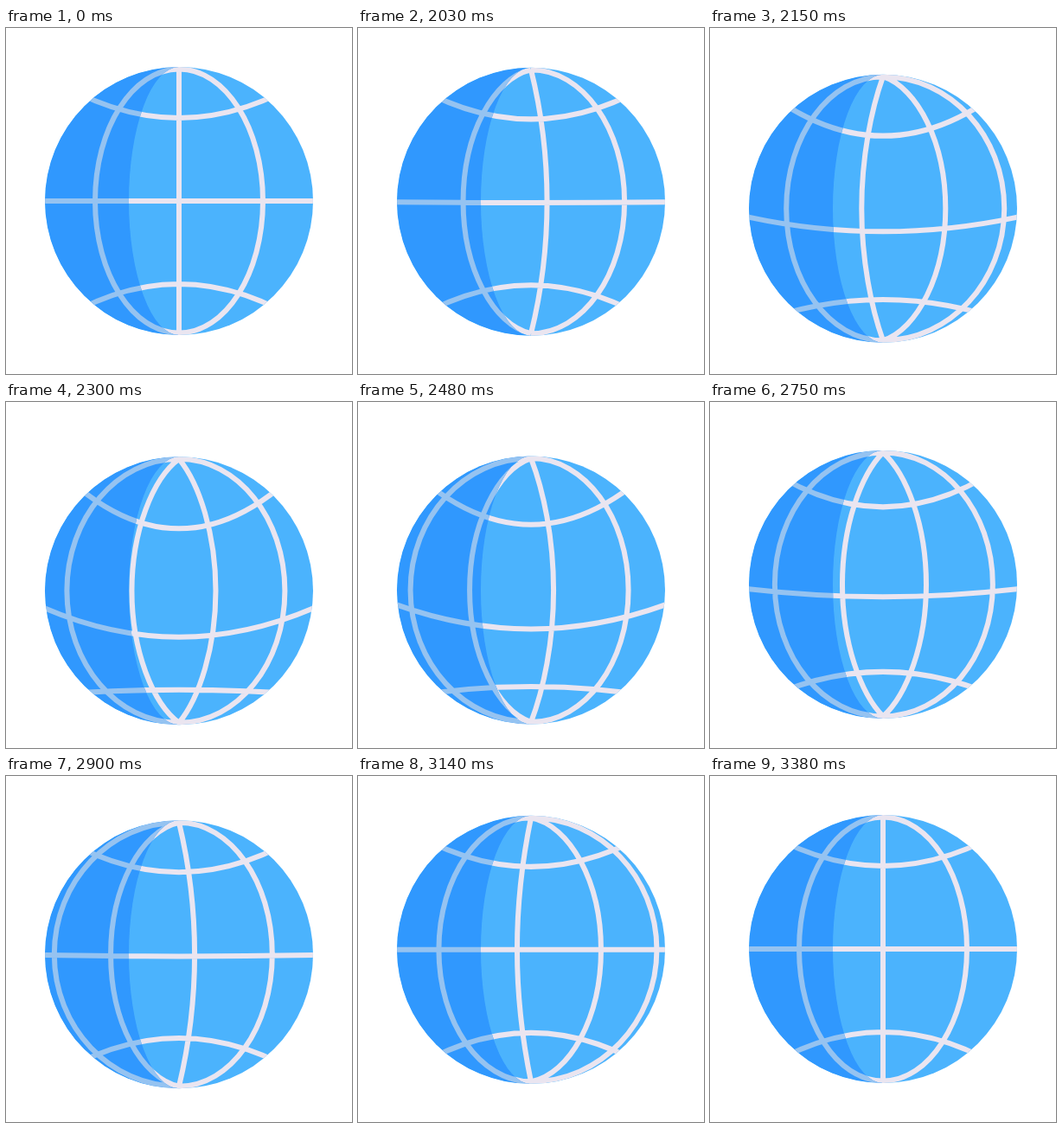
An HTML page that plays this animation: 400x400 px, repeating every 3.44 s.

```html
<!DOCTYPE html>
<html lang="en">
<head>
<meta charset="utf-8">
<title>Spinning globe</title>
<style>
  html, body { margin: 0; width: 100%; height: 100%; overflow: hidden; background: #fff; }
  svg { display: block; width: 100%; height: 100%; }
  .grid { fill: none; stroke-width: 6; }
</style>
</head>
<body>
<svg viewBox="0 0 400 400">
  <defs>
    <clipPath id="disc"><circle r="155"/></clipPath>
    <path id="shade" d="M0-155A155 155 0 0 0 0 155A58 155 0 0 1 0-155Z"/>
    <clipPath id="dark"><use href="#shade"/></clipPath>
    <path id="lines"/>
  </defs>
  <g id="globe" transform="translate(200 200)">
    <circle r="155" fill="#4bb3fd"/>
    <g clip-path="url(#disc)">
      <use class="grid" href="#lines" stroke="#eae5f0"/>
      <use href="#shade" fill="#3098fe"/>
      <g clip-path="url(#dark)"><use class="grid" href="#lines" stroke="#95c3f1"/></g>
    </g>
  </g>
</svg>
<script>
  const LOOP = 3440, START = 2000, STEP = 30, LAST = 46;
  const POLE = 152.5, INNER = 97, OUTER = 155, KAPPA = 0.5523;
  const globe = document.getElementById('globe');
  const lines = document.getElementById('lines');

  const mix = (a, b, u) => a + (b - a) * u;
  const ease = u => (1 - Math.cos(Math.PI * Math.min(1, Math.max(0, u)))) / 2;
  const swell = (k, from, peak, to) =>
    k < peak ? ease((k - from) / (peak - from)) : 1 - ease((k - peak) / (to - peak));

  // Meridian spacings turned: steady at first, then the fifth one eases out.
  function turnAt(k) {
    if (k <= 0 || k >= LAST) return 0;
    const slow = 28.5;
    return k < slow ? 4 + 0.1385 * (k - slow)
                    : 5 - Math.pow((LAST - k) / (LAST - slow), 2.3);
  }

  // pos: 0 is the straight middle, 1 the inner ellipse, 2 the rim.
  function meridian(pos) {
    const p = Math.abs(pos), side = Math.sign(pos), bend = Math.min(1, p);
    const x = side * (p < 1 ? INNER * p : mix(INNER, OUTER, p - 1));
    const x1 = x * KAPPA;
    const y1 = mix(POLE * 2 / 3, POLE, bend);
    const y2 = mix(POLE / 3, POLE * KAPPA, bend);
    return `M0 ${-POLE}C${x1} ${-y1} ${x} ${-y2} ${x} 0C${x} ${y2} ${x1} ${y1} 0 ${POLE}`;
  }

  // Parabola y = mid + curve * x * x across the disc.
  function parallel(mid, curve) {
    const w = 160, rise = curve * w * w;
    return `M${-w} ${mid + rise}Q0 ${mid - rise} ${w} ${mid + rise}`;
  }

  function draw(k) {
    const moving = k > 0 && k < LAST;
    const drop = moving ? 18.7 * swell(k, -0.5, 11, 42.3) : 0;
    const tilt = moving ? swell(k, 0, 10, 33) : 0;
    const turn = turnAt(k), part = turn % 1;

    let d = parallel(mix(-96, -72, tilt), mix(-0.0021, -0.0035, tilt))
          + parallel(53.3 * tilt, -0.00138 * tilt)
          + parallel(mix(96, 114.5, tilt), mix(0.0022, 0.00025, tilt));
    for (let i = -1; i <= 1; i++) {
      if (i < 1 || turn < 4.99) d += meridian(i + part);
    }
    if (turn > 0.2) d += meridian(part - 2);

    lines.setAttribute('d', d);
    globe.setAttribute('transform', `translate(200 ${200 + drop})`);
  }

  const t0 = performance.now();
  function tick() {
    const t = Math.max(0, performance.now() - t0) % LOOP;
    draw(Math.floor((t - START) / STEP));
    requestAnimationFrame(tick);
  }
  tick();
</script>
</body>
</html>
```
